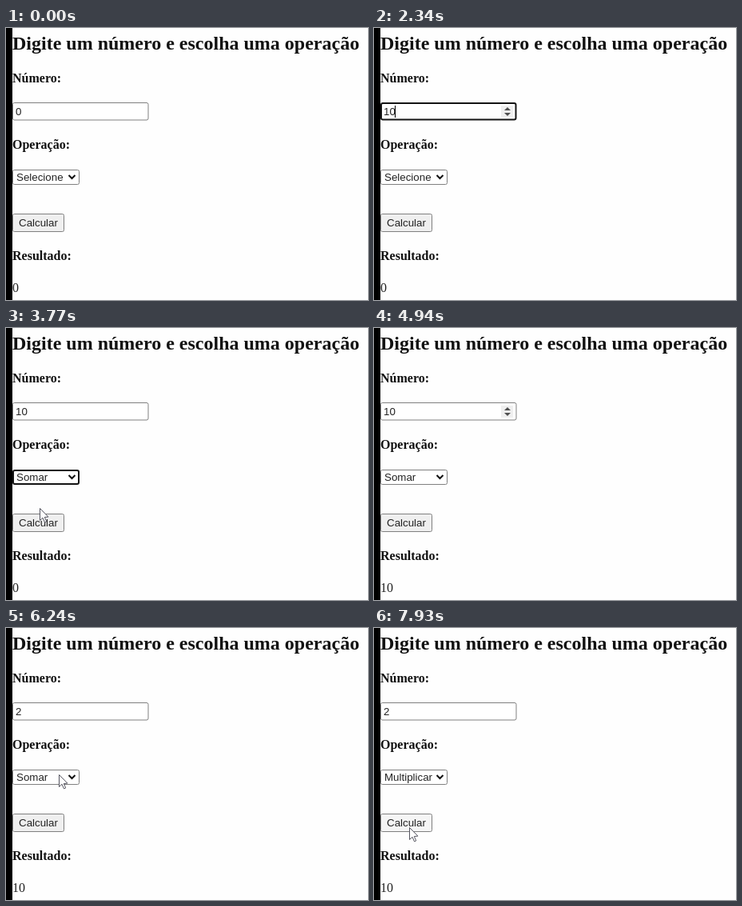
These frames come from a looping animation (453 px wide and 340 px high, 8000 ms). An HTML page with a canvas:

```html
<!DOCTYPE html>
<html lang="pt">
<head>
<meta charset="utf-8">
<title>Calculadora</title>
<style>
  html, body { margin: 0; width: 100%; height: 100%; overflow: hidden; background: #fefefe; }
  canvas { display: block; width: 453px; height: 340px; }
</style>
</head>
<body>
<canvas id="stage" width="453" height="340"></canvas>
<script>
const ctx = document.getElementById('stage').getContext('2d');
const LOOP = 8000;
const STEP = 130;
const KEY_GAP = 260;
const SERIF = '"Liberation Serif", "Times New Roman", serif';
const LABEL = `bold 16px ${SERIF}`;
const SANS = '13.333px "Liberation Sans", Arial, sans-serif';
const INK = '#111';
const SOFT = '#222';

const FIELD = { x: 90, y: 104 };
const BUTTON = { x: 45, y: 249 };

// One calculation each: enter a number, pick an operation, press the button
const first = {
  before: { number: '0', operation: 'Selecione', result: '0' },
  after: { number: '10', operation: 'Somar', result: '10' },
  focus: 780, type: 1690, leave: 2470, open: 3120, pick: 3770, press: 4030,
  select: { x: 62, y: 185 }, option: { x: 43, y: 225 }
};
const second = {
  before: first.after,
  after: { number: '2', operation: 'Multiplicar', result: '20' },
  focus: 5200, type: 5720, leave: 5980, open: 6240, pick: 7410, press: 7670,
  select: { x: 67, y: 183 }, option: { x: 45, y: 249 }
};

const within = (t, a, b) => t >= a && t < b;

function glide(from, to, t, start, end) {
  const k = Math.min(1, Math.max(0, (t - start) / (end - start)));
  const ease = k * k * (3 - 2 * k);
  return { x: from.x + (to.x - from.x) * ease, y: from.y + (to.y - from.y) * ease };
}

function pointer(t, r) {
  let p = glide(FIELD, r.select, t, r.leave, r.open);
  p = glide(p, r.option, t, r.open, r.open + 300);
  p = glide(p, BUTTON, t, r.pick, r.press);
  return glide(p, FIELD, t, r.press + 390, r.press + 910);
}

function text(str, x, y, font, color = INK) {
  ctx.font = font;
  ctx.fillStyle = color;
  ctx.fillText(str, x, y);
}

function box(x, y, w, h, fill, focused) {
  const line = focused ? 2 : 1;
  ctx.beginPath();
  ctx.roundRect(x + line / 2, y + line / 2, w - line, h - line, 2);
  ctx.fillStyle = fill;
  ctx.fill();
  ctx.lineWidth = line;
  ctx.strokeStyle = focused ? '#141414' : '#808080';
  ctx.stroke();
}

function shape(points, fill) {
  ctx.beginPath();
  points.forEach(([x, y]) => ctx.lineTo(x, y));
  ctx.closePath();
  ctx.fillStyle = fill;
  ctx.fill();
}

function spinner() {
  ctx.fillStyle = '#efefef';
  ctx.fillRect(159, 97, 15, 15);
  for (const dir of [-1, 1]) {
    const base = 104.5 + dir * 1.5;
    shape([[163, base], [167, base + dir * 4], [171, base]], '#505050');
  }
}

function numberField(t, r, hovered) {
  const focused = within(t, r.focus, r.open);
  const selected = within(t, r.focus + STEP, r.type);
  const keys = Math.min(r.after.number.length, Math.floor((t - r.type) / KEY_GAP) + 1);
  const value = keys > 0 ? r.after.number.slice(0, keys) : r.before.number;
  const lastInput = keys > 0 ? r.type + (keys - 1) * KEY_GAP : r.focus;

  box(8, 93, 170.5, 22.5, '#fff', focused);
  if (focused || hovered) spinner();
  ctx.font = SANS;
  const width = ctx.measureText(value).width;
  if (selected) {
    ctx.fillStyle = '#4a90d2';
    ctx.fillRect(12, 97, width, 15);
  }
  text(value, 12, 108.5, SANS, selected ? '#fff' : SOFT);
  if (focused && !selected && (t - lastInput) % 1000 < 500) {
    ctx.fillStyle = '#000';
    ctx.fillRect(Math.floor(12 + width), 97, 1, 15);
  }
}

function operationField(t, r) {
  box(8, 177, 84, 19, '#fff', within(t, r.pick, r.press));
  text((t < r.pick ? r.before : r.after).operation, 13, 190.5, SANS, SOFT);
  ctx.beginPath();
  ctx.moveTo(78.5, 184);
  ctx.lineTo(82.5, 188);
  ctx.lineTo(86.5, 184);
  ctx.lineWidth = 2;
  ctx.strokeStyle = INK;
  ctx.stroke();
}

function button(t, r) {
  const pressed = within(t, r.press, r.press + 300);
  box(8, 232, 65, 23, pressed ? '#f5f5f5' : '#efefef', false);
  text('Calcular', 16, 247.5, SANS, SOFT);
}

function arrow({ x, y }) {
  ctx.save();
  ctx.translate(Math.round(x) - 0.5, Math.round(y) + 0.5);
  shape([[0, 0], [0, 15], [3.5, 11.8], [6, 17.4], [8.2, 16.4], [5.8, 11], [10.4, 10.6]], '#fff');
  ctx.lineWidth = 1;
  ctx.strokeStyle = '#555560';
  ctx.stroke();
  ctx.restore();
}

function draw(t) {
  const r = t < first.press + 910 ? first : second;
  const p = pointer(t, r);
  const overField = within(p.y, 93, 116);

  ctx.fillStyle = '#fefefe';
  ctx.fillRect(0, 0, 453, 340);
  ctx.fillStyle = '#000';
  ctx.fillRect(0, 0, 8, 340);

  text('Digite um número e escolha uma operação', 8, 26.5, `bold 24px ${SERIF}`);
  text('Número:', 8, 68, LABEL);
  text('Operação:', 8, 151, LABEL);
  text('Resultado:', 8, 290, LABEL);

  numberField(t, r, overField && t >= r.focus - 260);
  operationField(t, r);
  button(t, r);
  text((t < r.press + 300 ? r.before : r.after).result, 8, 330, `16px ${SERIF}`, SOFT);

  // The pointer is a text beam over the number field and is not drawn there
  if (!overField) arrow(p);
}

const start = performance.now();
function tick() {
  const t = (performance.now() - start) % LOOP;
  draw(Math.floor(t / STEP) * STEP);
  requestAnimationFrame(tick);
}
tick();
</script>
</body>
</html>
```
